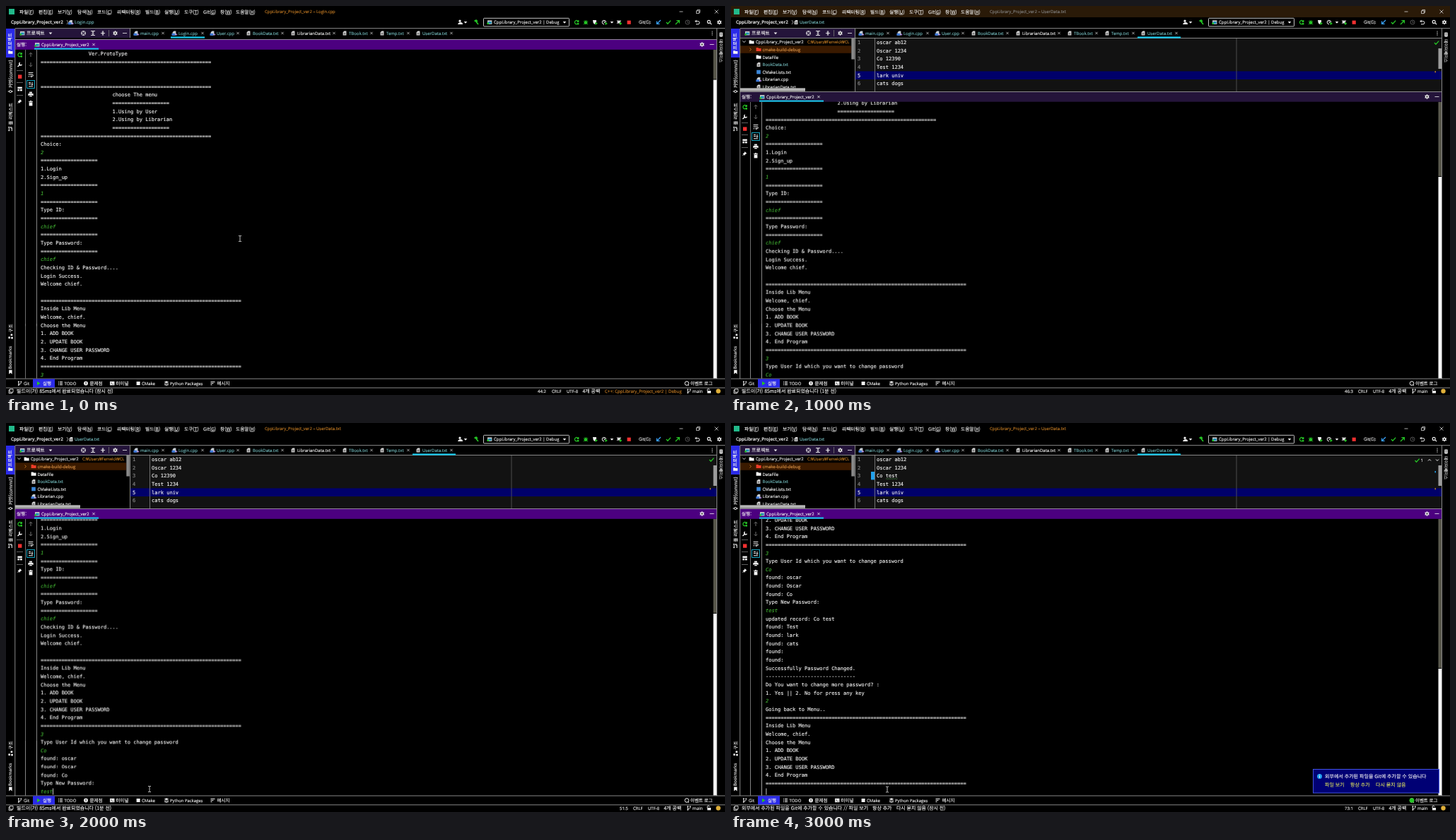
Write an HTML page that moves like this. It is 1017x551 px and loops after 4 s.

```html
<!DOCTYPE html>
<html lang="ko">
<head>
<meta charset="utf-8">
<title>CppLibrary_Project_ver2</title>
<style>
html, body { margin: 0; width: 100%; height: 100%; overflow: hidden; background: #000; }
svg { display: block; }
text { white-space: pre; text-rendering: geometricPrecision; stroke-width: .13px; }
.ui { font-family: "Open Sans", "Noto Sans CJK KR", "Noto Sans CJK", sans-serif; }
.kr { font-family: "Noto Sans CJK KR", "Noto Sans CJK", sans-serif; }
.mono { font-family: "DejaVu Sans Mono", "Noto Sans Mono", monospace; font-size: 7.04px; }
.in { font-style: italic; }
.u { text-decoration: underline; }
.s { animation: 4s step-end infinite; }
.s1000 { animation-name: s1000; }
.s0100 { animation-name: s0100; }
.s0010 { animation-name: s0010; }
.s0001 { animation-name: s0001; }
.s0111 { animation-name: s0111; }
.s0110 { animation-name: s0110; }
.s0011 { animation-name: s0011; }
.s1011 { animation-name: s1011; }
.drop { animation-name: drop; }
.scroll { animation-name: scroll; }
@keyframes s1000 { 0% { opacity: 1 } 25%, 100% { opacity: 0 } }
@keyframes s0100 { 0% { opacity: 0 } 25% { opacity: 1 } 50%, 100% { opacity: 0 } }
@keyframes s0010 { 0% { opacity: 0 } 50% { opacity: 1 } 75%, 100% { opacity: 0 } }
@keyframes s0001 { 0% { opacity: 0 } 75%, 100% { opacity: 1 } }
@keyframes s0111 { 0% { opacity: 0 } 25%, 100% { opacity: 1 } }
@keyframes s0110 { 0% { opacity: 0 } 25% { opacity: 1 } 75%, 100% { opacity: 0 } }
@keyframes s0011 { 0% { opacity: 0 } 50%, 100% { opacity: 1 } }
@keyframes s1011 { 0% { opacity: 1 } 25% { opacity: 0 } 50%, 100% { opacity: 1 } }
@keyframes drop { 0% { transform: translateY(0) } 25%, 100% { transform: translateY(74px) } }
@keyframes scroll {
  0% { transform: translateY(0) }
  25% { transform: translateY(-23.31px) }
  50% { transform: translateY(-81.59px) }
  75%, 100% { transform: translateY(-338px) }
}
</style>
</head>
<body>
<script>
const W = '#f4f4f4', LINE = '#a8a8a8', TEAL = '#74bcbe', ORANGE = '#c87e24', GREEN = '#25c425', CYAN = '#18ccf0';
const INPUT = '#40ae32', IDLE = '#24143a', PURPLE = '#4c0080', BLUE = '#2b2be8';
const ROW = 11.655;
const PROJECT = 'CppLibrary_Project_ver2';

const esc = s => s.replace(/&/g, '&amp;').replace(/</g, '&lt;');
const rect = (x, y, w, h, fill, more = '') => `<rect x="${x}" y="${y}" width="${w}" height="${h}" fill="${fill}" ${more}/>`;
const text = (cls, x, y, s, size, fill, more = '') =>
  `<text class="${cls}" x="${x}" y="${y + 2.3}" font-size="${size}" fill="${fill}" stroke="${fill}" ${more}>${esc(s)}</text>`;
const ui = (x, y, s, fill = W, size = 6, more) => text('ui', x, y, s, size, fill, more);
const kr = (x, y, s, fill = W, size = 6.5, more) => text('kr', x, y, s, size, fill, more);
const mono = (x, y, s, fill = W, cls = '') => text('mono ' + cls, x, y + .2, s, 7.04, fill);
const side = (x, y, s, angle, cls = 'kr', size = 6.4) =>
  `<text class="${cls}" transform="translate(${x} ${y}) rotate(${angle})" font-size="${size}" fill="${W}" stroke="${W}">${s}</text>`;
const show = (mask, ...parts) => `<g class="s s${mask}">${parts.join('')}</g>`;
const stroke = (x, y, d, c = W, w = 1) => `<path transform="translate(${x} ${y})" d="${d}" fill="none" stroke="${c}" stroke-width="${w}"/>`;
const solid = (x, y, d, c = W) => `<path transform="translate(${x} ${y})" d="${d}" fill="${c}"/>`;
const dot = (x, y, r, c) => `<circle cx="${x}" cy="${y}" r="${r}" fill="${c}"/>`;
const hline = (x, y, w, c = LINE) => rect(x, y, w, 0.8, c);
const vline = (x, y, h, c = LINE) => rect(x, y, 0.8, h, c);

const D = {
  close: 'M-1.7-1.7 1.7 1.7M-1.7 1.7 1.7-1.7',
  folder: 'M-3.4-2.6H-.6L.3-1.6H3.6V2.6H-3.4Z',
  file: 'M-.6-3.1H2.4V3.1H-2.4V-1.2Z',
  play: 'M-2-2.8 2.6 0-2 2.8Z',
  down: 'M-2.3-1.2H2.3L0 1.5Z',
  turn: 'M2.5-.8A2.6 2.6 0 1 0 2.3 1.4M2.8-3V-.7H.6',
  list: 'M-3-2H-2M-1-2H3M-3 0H-2M-1 0H3M-3 2H-2M-1 2H3',
  branch: 'M-1.6-3V3M-1.6 1.2C1.6 1.2 1.8 0 1.8-2.6M-2.6-2.4H-.6M.8-2.4H2.8M-2.6 2.5H-.6',
  check: 'M-3 0-1 2.2 3.2-2.4',
  beam: 'M-2-4H-.5L0-3.5.5-4H2M0-3.5V3.5M-2 4H-.5L0 3.5.5 4H2'
};
const gear = (x, y, c = W) => stroke(x, y, 'M0-3.3V3.3M-2.9-1.6 2.9 1.6M-2.9 1.6 2.9-1.6', c, 1.3) + dot(x, y, 2.3, c) + dot(x, y, 1, '#000');
const minus = (x, y) => hline(x - 3, y - .3, 6, W);
const txtIcon = (x, y) => solid(x, y, D.file, '#d8d8d8') + stroke(x, y, 'M-1.3-.2H1.3M-1.3 1.4H1.3', '#222', .7);
const cppIcon = (x, y) => solid(x, y, D.file, '#c6cdd4') + rect(x - 3.6, y + .3, 4.6, 3, '#3c78d8') + stroke(x, y, 'M1.5 1.9H4.3M2.9.6V3.2', '#b58cf0', .9);
const appIcon = (x, y) => rect(x - 3, y - 2.6, 6.4, 5.4, '#d0d0d0') + rect(x - 2.2, y - 1, 4.8, 3, '#1d8fb8') + rect(x - 3.6, y + .6, 2.6, 2.4, GREEN);

function consoleLines() {
  const eq = n => '='.repeat(n), pad = (n, s) => ' '.repeat(n) + s, cmd = s => ({ cmd: s });
  const menu = [eq(67), 'Inside Lib Menu', 'Welcome, chief.', 'Choose the Menu', '1. ADD BOOK', '2. UPDATE BOOK',
    '3. CHANGE USER PASSWORD', '4. End Program', eq(67)];
  return [pad(16, 'Ver.ProtoType'), eq(57), '', '', eq(57), pad(24, 'choose The menu'), pad(24, eq(19)),
    pad(24, '1.Using by User'), pad(24, '2.Using by Librarian'), pad(24, eq(19)), eq(57), 'Choice:', cmd('2'),
    eq(19), '1.Login', '2.Sign_up', eq(19), cmd('1'), eq(19), 'Type ID:', eq(19), cmd('chief'),
    eq(19), 'Type Password:', eq(19), cmd('chief'), 'Checking ID & Password....', 'Login Success.', 'Welcome chief.', '',
    ...menu, cmd('3'), 'Type User Id which you want to change password', cmd('Co'),
    'found: oscar', 'found: Oscar', 'found: Co', 'Type New Password:', cmd('test'),
    'updated record: Co test', 'found: Test', 'found: lark', 'found: cats', 'found:', 'found:',
    'Successfully Password Changed.', '-'.repeat(30), 'Do You want to change more password? :',
    '1. Yes || 2. No for press any key', cmd('2'), 'Going back to Menu..', ...menu];
}

function terminal() {
  const rows = consoleLines().map((l, i) => {
    const y = 522 - (39 - i) * ROW;
    return l.cmd ? mono(49, y, l.cmd, INPUT, 'in') : mono(49, y, l);
  }).join('');
  const bar = (mask, top, split) => show(mask, rect(1000.5, top, 4.6, split - top, '#59584c'), rect(1000.5, split + 1, 4.6, 526.5 - split, W));
  return `<g clip-path="url(#con)"><g class="s scroll">${rows}</g></g>`
    + bar('1000', 62, 103.5) + bar('0100', 136, 241) + bar('0010', 136, 269) + bar('0001', 136, 347)
    + show('0010', vline(66, 517.5, 9, W)) + show('0001', vline(49.5, 517.5, 9, W));
}

function titleBar() {
  const menu = [[19, '파일', 'F'], [46, '편집', 'E'], [73, '보기', 'V'], [101, '탐색', 'N'], [129, '코드', 'C'], [157, '리팩터링', 'R'],
    [197, '빌드', 'B'], [224, '실행', 'U'], [252, '도구', 'T'], [279, 'Git', 'G'], [303, '창', 'W'], [325, '도움말', 'H']];
  const title = (name, c) => ui(366, 8, PROJECT + ' – ' + name, c, 5.95);
  return show('0100', rect(0, 0, 1017, 16, '#2a1a08')) + rect(4, 4, 8, 8, '#22b98a')
    + menu.map(([x, s, k]) => `<text class="kr" x="${x}" y="10.6" font-size="6.7" fill="${W}" stroke="${W}">${s}(<tspan class="u">${k}</tspan>)</text>`).join('')
    + show('1000', title('Login.cpp', ORANGE)) + show('0100', title('UserData.txt', '#858585')) + show('0011', title('UserData.txt', ORANGE))
    + stroke(955, 8, 'M-2.5 0H2.5', W, .7) + stroke(979, 8, 'M-2.5-1.2H1.3V2.6H-2.5ZM-1.2-1.2V-2.6H2.6V1.2H1.3', W, .7)
    + stroke(1005, 8, 'M-2.5-2.5 2.5 2.5M-2.5 2.5 2.5-2.5', W, .7);
}

function navBar() {
  return ui(7, 23, PROJECT, W, 6.35, 'font-weight="600"') + stroke(87, 23, 'M-1-3 1 0-1 3', '#bbb', .8)
    + show('1000', cppIcon(91.5, 23), ui(97, 23, 'Login.cpp', TEAL, 6.1))
    + show('0111', txtIcon(92, 23), ui(97, 23, 'UserData.txt', TEAL))
    + dot(642, 21.2, 1.6, W) + solid(643, 24, 'M-4 2Q-3-1 0-1T3 2Z') + solid(650, 23.3, D.down)
    + stroke(665, 23, 'M-2.5-1.5 0-3 2-1M-.8-1.8 3 3', GREEN, 1.7)
    + rect(675.5, 17.3, 121, 11.6, '#000', `stroke="${W}" stroke-width=".8" rx="1"`) + appIcon(684, 23)
    + ui(690, 23, PROJECT + ' | Debug') + solid(790, 23.3, D.down)
    + stroke(807, 23, D.turn, GREEN, 1.2) + rect(808, 24, 2.4, 2.4, GREEN)
    + dot(820, 23.6, 2.4, GREEN) + stroke(820, 23, 'M-3.2-1.5 3.2 3M3.2-1.5-3.2 3M-1.5-3 0-1 1.5-3', GREEN, .8)
    + solid(833, 23, 'M-3-3H2V0L-.5 3Q-3 1-3-3Z') + solid(835, 24.4, 'M-1.5-2 2 .3-1.5 2.5Z', GREEN)
    + stroke(846, 23, 'M2.6 0A2.7 2.7 0 1 0 0 2.7M0-1.5V.3H1.5') + solid(849, 24.6, 'M-1.5-2 2 .3-1.5 2.5Z', GREEN)
    + solid(857, 23.3, D.down) + dot(867, 22.6, 2.3, '#bbb') + stroke(867, 22.6, 'M-3-2 3 2M-3 2 3-2') + solid(869.5, 24.6, 'M-1.5-2 2 .3-1.5 2.5Z', GREEN)
    + rect(878.6, 20.6, 5.2, 5.2, '#f03030') + ui(895, 23, 'Git(G):')
    + stroke(923, 23, 'M3-3-2 2M-2.4-1.6V2.4H1.6', '#38a0f8', 1.3) + stroke(937, 23, D.check, GREEN, 1.4)
    + stroke(950, 23, 'M-3 3 2-2M-1.6-2.4H2.4V1.6', GREEN, 1.3)
    + stroke(964, 23, 'M3 0A3 3 0 1 1-3 0A3 3 0 1 1 3 0M0-1.8V.3H1.6', '#666', .8)
    + stroke(978, 23, 'M-1.2-3.2-3-1.4-1.2.4M-3-1.4H.8A2.1 2.1 0 0 1 .8 2.8H-2')
    + stroke(995, 23, 'M1.2-.6A2 2 0 1 1-2.8-.6A2 2 0 1 1 1.2-.6M.8 1 3.2 3.2', W, 1.1) + gear(1009, 23);
}

function tabs() {
  const list = [[184, 'main.cpp', 222], [238, 'Login.cpp', 278], [292, 'User.cpp', 328], [343, 'BookData.txt', 391],
    [406, 'LibrarianData.txt', 464], [479, 'TBook.txt', 517], [532, 'Temp.txt', 569], [583, 'UserData.txt', 630]];
  const tab = ([x, s, end]) => (s.endsWith('cpp') ? cppIcon : txtIcon)(x, 38.5)
    + ui(x + 6, 38.7, s, s === 'LibrarianData.txt' ? W : TEAL) + stroke(end, 38.5, D.close, '#ccc', .8);
  return rect(13, 32, 162, 13, IDLE) + appIcon(23, 38.5) + kr(29, 38.5, '프로젝트', W, 7) + solid(63, 38.8, D.down)
    + stroke(109.5, 38.5, 'M3 0A3 3 0 1 1-3 0A3 3 0 1 1 3 0M0-3V-1M0 3V1M-3 0H-1M3 0H1', W, .9)
    + stroke(123, 38.5, 'M-3-3H3M-3 3H3M0-2V2M-1.4-.8 0-2 1.4-.8M-1.4.8 0 2 1.4.8', W, .9)
    + stroke(137, 38.5, 'M-3 0H3M0-3.5V-1M-1.3-2 0-.9 1.3-2M0 3.5V1M-1.3 2 0 .9 1.3 2', W, .9)
    + vline(145, 34, 9, '#777') + gear(154.5, 38.5) + minus(168, 38.5) + list.map(tab).join('')
    + [-2.4, 0, 2.4].map(d => dot(999, 38.5 + d, .7, W)).join('') + hline(13, 31.3, 1004) + vline(175, 32, 13);
}

const tabMarks = () => show('1000', rect(233, 43.4, 48, 2.2, CYAN)) + show('0111', rect(575, 43.4, 61, 2.2, CYAN));

function tree() {
  const item = (y, s, c, icon) => icon(39, y) + ui(44.5, y, s, c);
  const folder = c => (x, y) => solid(x, y, D.folder, c);
  return `<g clip-path="url(#tree)">` + rect(13, 56.3, 157, 10.5, '#3a1a00')
    + stroke(18.5, 50.5, 'M-2-1 0 1 2-1', W, .9) + solid(29, 51, D.folder) + ui(35, 51, PROJECT)
    + ui(108, 51, 'C:₩Users₩Fenwick₩CL', ORANGE, 5.9) + stroke(27.5, 61.5, 'M-1-2 1 0-1 2', ORANGE, .9)
    + item(61.5, 'cmake-build-debug', '#dd9448', folder('#ee3c28')) + item(72.2, 'DataFile', W, folder(W))
    + item(83, 'BookData.txt', TEAL, txtIcon) + item(93.5, 'CMakeLists.txt', W, (x, y) => rect(x - 2.8, y - 2.8, 5.6, 5.6, '#3a86d8'))
    + item(104, 'Librarian.cpp', W, cppIcon) + item(114.5, 'LibrarianData.txt', W, txtIcon)
    + '</g>' + rect(170.3, 46, 4.4, 29.5, '#8b8b8b') + rect(13, 116.3, 92, 4.4, '#b5b5b5');
}

function editor() {
  const rows = ['oscar ab12', 'Oscar 1234', 'Co 12390', 'Test 1234', 'lark univ', 'cats dogs'];
  const y = i => 51.5 + i * ROW;
  const row = (s, i) => mono(179, y(i), String(i + 1), i === 4 ? W : '#8a8a8a')
    + (i === 2 ? show('0110', mono(206, y(i), s)) + show('0001', mono(206, y(i), 'Co test')) : mono(206, y(i), s));
  return show('0111', rect(13, 45, 992, 77, '#000'), rect(176, 45.5, 829, 76, '#121212'), tree(),
    rect(176, 92.4, 829, 11.6, '#00006a'), vline(203, 45.5, 76, '#8a8a8a'), vline(714.6, 45.5, 76, '#5c5c5c'),
    ...rows.map(row), rect(1000.5, 60, 4.5, 29, '#9c9c9c'), rect(995.5, 92, 1.5, 2.4, '#b07828'),
    hline(13, 45, 992), vline(175, 45, 76),
    show('0110', stroke(998, 52, D.check, GREEN, 1.3)),
    show('0001', rect(198, 69, 5, 11.4, '#22a2ee'), rect(995.5, 68, 1.5, 2.4, '#22a2ee'),
      stroke(219, 79, 'M0 .4 1.5-.3 3 .4 4.5-.3 6 .4 7.5-.3 9 .4 10.5-.3 12 .4 13.5-.3 15 .4 16.5-.3', '#4fa04f', .6),
      stroke(970.5, 53, D.check, GREEN, 1.3), ui(975.5, 53, '1'), stroke(988, 52.5, 'M-2 1 0-1 2 1'), stroke(999, 52.5, 'M-2-1 0 1 2-1')));
}

function runPanel() {
  return `<g clip-path="url(#con)">${vline(27, 62, 465, '#8a8a8a')}</g>` + vline(43, 62, 466)
    + show('0111', rect(13, 121.3, 992, 14.4, '#000'), rect(26, 62, 2, 59, 'none'))
    + '<g class="s drop">' + rect(13, 47.3, 992, 14.4, IDLE) + show('1011', rect(13, 47.3, 992, 14.4, PURPLE))
    + hline(13, 47, 992) + kr(15, 54.7, '실행:', W, 6.6) + appIcon(44, 54.7) + ui(50, 54.8, PROJECT) + stroke(124, 54.6, D.close, W, .8)
    + rect(40, 59.6, 91, 2, CYAN) + gear(984.5, 54.5) + minus(998.5, 54.5)
    + stroke(19.5, 69, D.turn, GREEN, 1.2) + rect(20.6, 70.2, 2.4, 2.4, GREEN)
    + stroke(19.5, 83, 'M-3 3 .6-.6M.3-2.8A2 2 0 1 0 3-.2', W, 1.4)
    + hline(15, 91, 9, '#777') + rect(17, 97.4, 5.4, 5.4, '#f03030') + hline(15, 108, 9, '#777')
    + rect(16.4, 114.6, 6.4, 2.6, W) + rect(16.4, 118, 2.8, 2.4, W) + rect(20, 118, 2.8, 2.4, W) + hline(15, 126, 9, '#777')
    + stroke(19.5, 135, 'M-3 3-.8.8', W, .9) + solid(19.5, 135, 'M0-3 3 0 1.8.2.2 1.8 0 3-3 0-1.8-.2-.2-1.8Z')
    + stroke(35, 69, 'M0 3V-2.6M-2.2-.6 0-2.8 2.2-.6', '#707070') + stroke(35, 83, 'M0-3V2.6M-2.2.6 0 2.8 2.2.6', '#707070')
    + stroke(35, 97, 'M-3.4-2.6H3.4M-3.4 0H2A1.4 1.4 0 0 1 2 2.8H0M1.2 1.4-.2 2.8 1.2 4M-3.4 2.8H-1.6')
    + rect(29.6, 105.4, 11, 11, '#000', `stroke="${CYAN}" stroke-width=".8"`)
    + stroke(35, 111, 'M-3-2.6H0M-3-.4H0M-3 2.8H3M2-3V1M.6-.2 2 1.2 3.4-.2')
    + rect(33, 121.6, 4, 2, W) + rect(31.4, 124, 7.2, 3, W) + rect(33, 126.4, 4, 2.2, W, 'stroke="#000" stroke-width=".5"')
    + rect(32.6, 136.4, 4.8, 5, W) + rect(32, 134.8, 6, 1, W) + rect(34, 134, 2, 1, W) + '</g>';
}

function stripes() {
  return rect(0, 32, 12.4, 41, BLUE) + side(8.4, 62, '프로젝트', -90) + `<g transform="translate(6.2 65.5) scale(.9)">${solid(0, 0, D.folder)}</g>`
    + side(8.6, 116, '커밋(commit)', -90, 'kr', 6.5) + stroke(6.3, 121, 'M-3.6 0H-1.6M1.6 0H3.6M1.6 0A1.6 1.6 0 1 1-1.6 0A1.6 1.6 0 1 1 1.6 0')
    + side(8.6, 168.5, '풀 리퀘스트', -90) + stroke(6.3, 174, 'M-2-3V3M-3-2.5H-1M-3 2.6H-1M2 3V-1.8H0M1-3-.2-1.8 1-.6')
    + side(8.6, 462.5, '구조', -90) + rect(6.6, 464.5, 2.6, 2.6, W) + rect(3.4, 468.4, 2.6, 2.6, W) + rect(7.2, 468.8, 2.6, 2.6, W)
    + side(8.4, 514, 'Bookmarks', -90, 'ui', 6.1)
    + solid(6.4, 518.4, 'M-2.2-3H2.2V3L0 1.2-2.2 3Z') + vline(12.4, 32, 496) + vline(1005.2, 32, 496)
    + rect(1009, 37.4, 5, 6, W, 'rx="1.4"') + stroke(1011.5, 40, 'M-2.4-.8H2.4M-2.4 1.2H2.4', '#000', .6)
    + side(1009.2, 47, '데이터베이스', 90, 'kr', 6);
}

function bottom() {
  const build = when => kr(15, 545.5, `빌드이(가) 85ms에서 완료되었습니다 (${when} 전)`, W, 6.95);
  const place = x => ui(x + 5, 545.5, 'CRLF') + ui(x + 26, 545.5, 'UTF-8') + kr(x + 48.5, 545.5, '4개 공백', W, 6.9);
  const ask = '외부에서 추가된 파일을 Git에 추가할 수 있습니다';
  return hline(0, 527.6, 1017) + rect(38, 528.3, 31, 12.4, BLUE) + hline(0, 540.5, 1017)
    + stroke(19.5, 534.5, D.branch) + ui(25, 534.5, 'Git') + solid(46, 534.5, D.play, GREEN) + kr(52, 534.5, '실행')
    + stroke(77, 534.5, D.list) + ui(82.5, 534.5, 'TODO') + dot(113, 534.5, 2.9, W) + rect(112.6, 532.6, .9, 2.4, '#000') + rect(112.6, 535.6, .9, .9, '#000')
    + kr(118.5, 534.5, '문제점') + rect(147, 531.8, 6.4, 5.4, W) + stroke(150, 534.4, 'M-1.8-1.4-.4 0-1.8 1.4M.3 1.4H2', '#000', .7)
    + kr(155.5, 534.5, '터미널') + rect(184.6, 532, 5, 5, W) + ui(192, 534.5, 'CMake')
    + solid(227, 534.5, 'M0-3.2 3.2-1.7 0-.2-3.2-1.7Z') + stroke(227, 534.5, 'M-3 0 0 1.4 3 0M-3 1.7 0 3.1 3 1.7', W, .9)
    + ui(232, 534.5, 'Python Packages', W, 5.9) + stroke(292.5, 534.5, 'M-3-2H3M-3 0H1M-3 2H-1') + kr(298.5, 534.5, '메시지')
    + stroke(963, 534.5, 'M2.8 0A2.8 2.8 0 1 1-2.8 0A2.8 2.8 0 1 1 2.8 0M1.6 2 3 3.2') + show('0001', dot(963, 534.5, 3.3, GREEN))
    + kr(968, 534.5, '이벤트 로그', W, 6.45)
    + stroke(7, 545.5, 'M-1.6-3H3V1.6H-1.6ZM-1.6-1.6H-3V3H1.6V1.6', W, .8)
    + show('1000', build('잠시'), ui(752, 545.5, '44:2'), place(767), ui(847, 545.5, `C++: ${PROJECT} | Debug`, ORANGE, 6.15))
    + show('0110', build('1분'))
    + show('0001', kr(15, 545.5, ask + ' // 파일 보기', W, 6.95), kr(200, 545.5, '항상 추가', W, 6.95), kr(234, 545.5, '다시 묻지 않음 (잠시 전)', W, 6.9))
    + show('0111', place(882)) + show('0100', ui(868, 545.5, '46:3')) + show('0010', ui(868, 545.5, '51:5')) + show('0001', ui(868, 545.5, '73:1'))
    + stroke(966, 545.5, D.branch) + ui(971, 545.5, 'main', W, 6.2)
    + rect(992, 545, 5, 3.4, W) + stroke(993.5, 544, 'M-1.4 1V-.4A1.4 1.4 0 0 1 1.4-.4') + dot(1007.5, 545.5, 3.2, '#e0b03a')
    + show('0001', rect(823.5, 490.5, 178, 33.5, '#000074', 'stroke="#4a5cf0" stroke-width=".9"'),
      dot(832.5, 500.5, 3.5, '#20a0f0'), rect(832, 500, 1, 2.6, W), rect(832, 498.2, 1, 1, W), kr(840, 500.5, ask, W, 7),
      ...[[840, '파일 보기'], [876, '항상 추가'], [912, '다시 묻지 않음']].map(([x, s]) => kr(x, 512.3, s, '#d3d860', 7)));
}

const pointer = (mask, x, y) => show(mask, stroke(x, y, D.beam, W, .8));

document.body.innerHTML = `<svg width="1017" height="551" viewBox="0 0 1017 551">
<clipPath id="con"><rect x="13" y="62" width="987" height="465.5"/></clipPath>
<clipPath id="tree"><rect x="13" y="45" width="157" height="71.5"/></clipPath>`
  + rect(0, 0, 1017, 551, '#000') + terminal() + titleBar() + navBar() + tabs()
  + `<g class="s drop">${vline(27, 62, 391.5, '#8a8a8a')}${vline(43, 62, 391.5)}</g>`
  + runPanel().replace(/^.*?(?=<g class="s drop">)/s, vline(27, 450, 77.5, '#8a8a8a') + vline(43, 450, 77.5) + editor())
  + tabMarks() + stripes() + bottom()
  + pointer('1000', 331, 329.5) + pointer('0010', 203, 518.5) + pointer('0001', 221, 519) + '</svg>';
</script>
</body>
</html>
```
